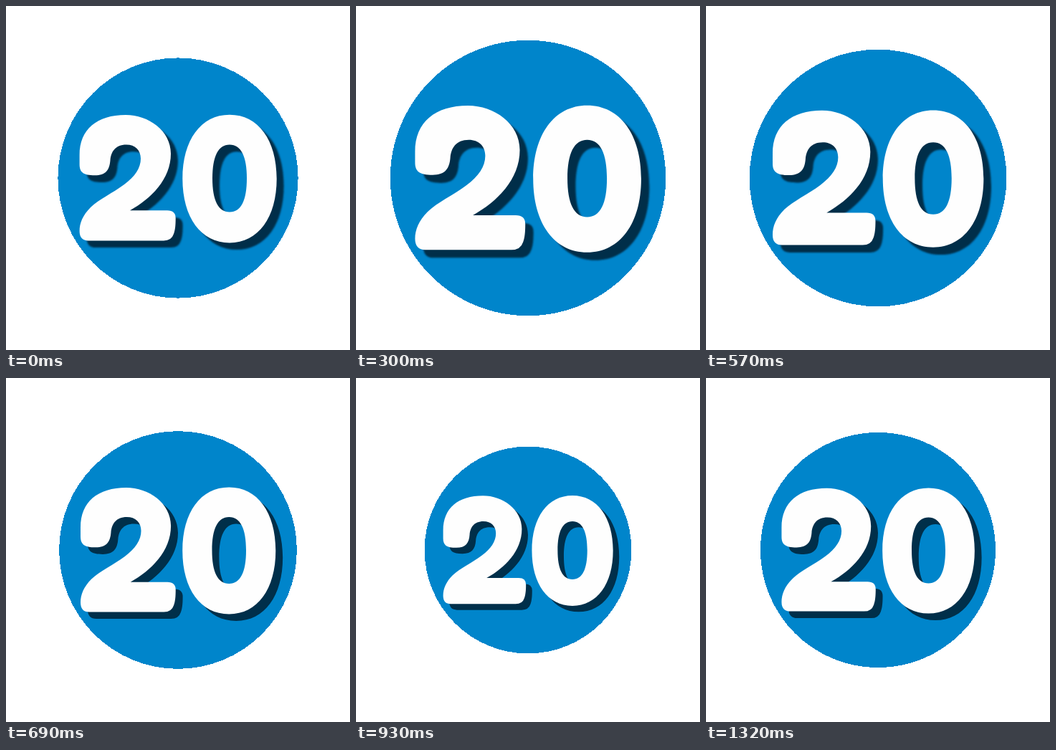
Recreate the animation shown at these times as an HTML page without scripts. Size 480 by 480 pixels, loop 1.35 s.

```html
<!DOCTYPE html>
<html lang="en">
<head>
<meta charset="utf-8">
<title>Pulsing 20</title>
<style>
  @property --phase {
    syntax: "<angle>";
    inherits: false;
    initial-value: 0deg;
  }
  html, body {
    margin: 0;
    width: 100%;
    height: 100%;
    overflow: hidden;
    background: #fff;
  }
  svg {
    display: block;
    width: 100%;
    height: 100%;
  }
  /* One sine wave per loop, sampled every 30 ms */
  .badge {
    transform-origin: 240px 240px;
    transform: scale(calc(1 + .1492 * sin(var(--phase))));
    animation: pulse 1350ms steps(45) infinite;
  }
  @keyframes pulse {
    from { --phase: 0deg; }
    to { --phase: 360deg; }
  }
  .disc { fill: #0085cb; shape-rendering: crispEdges; }
  .shadow { fill: #002f4a; filter: url(#soften); }
  .digits { fill: #fefefe; }
</style>
</head>
<body>
<svg viewBox="0 0 480 480" role="img" aria-label="20">
  <defs>
    <filter id="soften">
      <feGaussianBlur stdDeviation=".8"/>
    </filter>
    <g id="twenty">
      <path d="M102.6 208C102.6 172 127 152 167 152C199 152 230 174 230 206
               C230 242 202 269 173 285.3L225 285.3Q236.7 285.3 236.7 296
               C236.7 306 236 313 234 318Q231 327.4 220 327.4L115 327.4Q102.6 327.4 102.6 314
               C102.6 303 107 292 118 281C130 269.5 149 261 165 249
               C180 238 188 226 188 213C188 201 180 193.5 168 193.5
               C152 193.5 146.5 204 145.5 215C144.5 229 139 236.3 124 236.3
               C108 236.3 102.6 232 102.6 221Z"/>
      <path fill-rule="evenodd"
            d="M246.3 241C246.3 187 272 151.7 312 151.7S377.7 187 377.7 241S352 330.4 312 330.4S246.3 295 246.3 241Z
               M288 240.5C288 210 296 193.5 312 193.5S336 210 336 240.5S328 287.5 312 287.5S288 271 288 240.5Z"/>
    </g>
  </defs>
  <g class="badge">
    <circle class="disc" cx="240" cy="240" r="167.6"/>
    <use class="shadow" href="#twenty" x="10" y="9.7"/>
    <use class="digits" href="#twenty"/>
  </g>
</svg>
</body>
</html>
```
